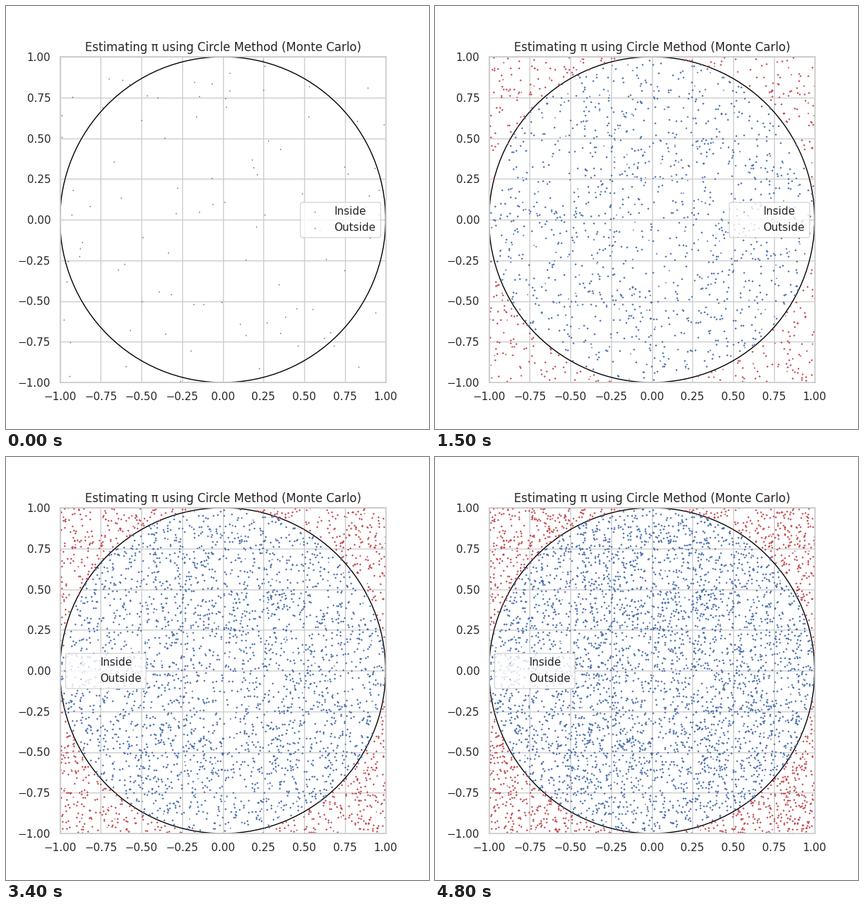
Animation, 600 px wide and 600 px high, one loop 4900 ms. Source, as a matplotlib script:

```python
import matplotlib.pyplot as plt
import numpy as np
from matplotlib.animation import FuncAnimation

FRAMES, BATCH, LAYERS = 49, 100, 5
BLUE, RED, GRID, INK = "#4C72B0", "#C44E52", "#cccccc", "#262626"

plt.rcParams.update({"font.family": "DejaVu Sans", "text.color": INK})

rng = np.random.default_rng(7)
samples = rng.uniform(-1, 1, (BATCH * FRAMES, 2))
inside = np.hypot(*samples.T) <= 1

fig, ax = plt.subplots(figsize=(6, 6), dpi=100)
ax.set(xlim=(-1, 1), ylim=(-1, 1), aspect="equal")
ticks = np.linspace(-1, 1, 9)
ax.set_xticks(ticks)
ax.set_yticks(ticks)
ax.set_axisbelow(True)
ax.grid(color=GRID, linewidth=1)
ax.tick_params(length=6, left=False, bottom=False, labelsize=11, labelcolor=INK)
for spine in ax.spines.values():
    spine.set(color=GRID, linewidth=1.25)
ax.set_title("Estimating π using Circle Method (Monte Carlo)", fontsize=12)
ax.add_patch(plt.Circle((0, 0), 1, fill=False, color="black", linewidth=1))


def add_dots(color):
    return ax.scatter([], [], s=1.5, color=color, linewidths=0)


# Dots are painted over again each step, so older ones look denser.
layers = [(add_dots(BLUE), add_dots(RED)) for _ in range(LAYERS)]


def add_legend(loc):
    legend = ax.legend(layers[0], ("Inside", "Outside"), loc=loc, fontsize=11,
                       framealpha=0.8, edgecolor=GRID)
    ax.add_artist(legend)
    return legend


legends = {loc: add_legend(loc)
           for loc in ("center right", "lower center", "center left")}
ax.legend_ = None


def legend_spot(step):
    if step >= 20:
        return "center left"
    return "lower center" if 9 <= step <= 12 else "center right"


def update(step):
    for age, (hits, misses) in enumerate(layers):
        count = max(0, step + 1 - age) * BATCH
        shown, hit = samples[:count], inside[:count]
        hits.set_offsets(shown[hit])
        misses.set_offsets(shown[~hit])
    spot = legend_spot(step)
    for loc, legend in legends.items():
        legend.set_visible(loc == spot)
    return []


anim = FuncAnimation(fig, update, frames=FRAMES, interval=100,
                     repeat=True, repeat_delay=0, blit=False)
plt.show()
```
